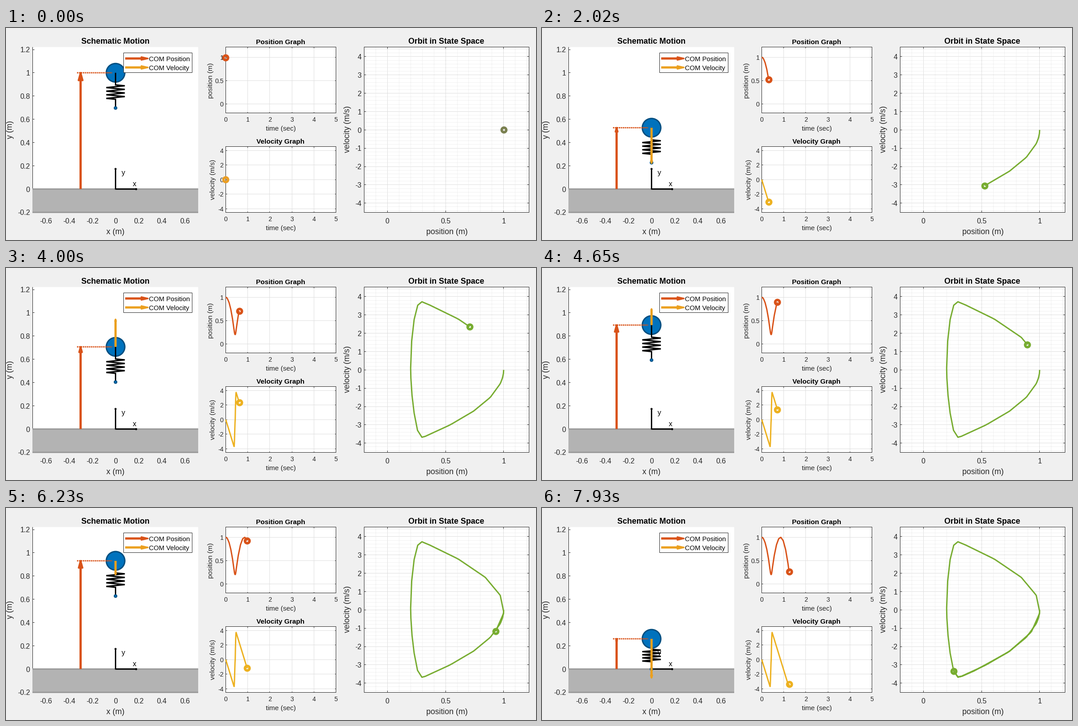
A matplotlib script for the animation above (7990 ms loop, 1183 by 473 pixels).

```python
import numpy as np
import matplotlib.pyplot as plt
from matplotlib.animation import FuncAnimation
from matplotlib.collections import LineCollection
from matplotlib.patches import Circle, Polygon, Rectangle

W, H, DPI = 1183, 473, 128
PT = 72 / DPI
LOOP, STEP = 7990, 34
ORANGE, AMBER, GOLD, GREEN = "#D95319", "#EBA020", "#EDB120", "#77AC30"
BLUE, NAVY, INK = "#0072BD", "#004E80", "#262626"

plt.rcParams["font.family"] = "Liberation Sans"
plt.rcParams["path.snap"] = False
fig = plt.figure(figsize=(W / DPI, H / DPI), dpi=DPI, facecolor="#F0F0F0")
ax = fig.add_axes([0, 0, 1, 1])
ax.set_xlim(0, W)
ax.set_ylim(H, 0)
ax.axis("off")


# ---------- motion: bouncing mass on a spring, sampled every 0.01 s ----------
G, APEX, FALL = 9.81, 0.8505, 0.3778


def flight(times, apex, top):
    t = np.array(times)
    v = G * (apex - t)
    return np.column_stack([t, top - v ** 2 / (2 * G), v])


stance = [(.38, .297, -3.68), (.39, .259, -3.30), (.40, .230, -2.36),
          (.41, .212, -1.40), (.42, .202, -.45), (.43, .200, .10),
          (.44, .209, 1.58), (.45, .230, 2.75), (.46, .261, 3.53),
          (.47, .297, 3.72)]
nodes = np.vstack([
    flight([0, .02, .045, .0765, .153, .2295, .306, FALL], 0, 1),
    stance,
    flight([.49, .567, .669, .769, .866, .974, 1.084, 1.19, APEX + FALL],
           APEX, 1.003),
    [(1.24, .260, -3.35)],
])
ts = np.arange(125) * 0.01
pos = np.interp(ts, nodes[:, 0], nodes[:, 1])
vel = np.interp(ts, nodes[:, 0], nodes[:, 2])

# sample number against playback time in ms
pace = np.array([
    (0, 0), (1, 90), (13, 870), (14, 930), (25, 1640), (26, 1730), (31, 2020),
    (32, 2110), (38, 2480), (39, 2570), (49, 3240), (51, 3330), (52, 3430),
    (61, 4000), (64, 4180), (65, 4240), (78, 5020), (79, 5110), (84, 5380),
    (85, 5470), (92, 5890), (93, 5950), (105, 6700), (106, 6800), (109, 6990),
    (118, 7550), (119, 7610), (124, 7930)])


def sample_at(ms):
    return int(np.interp(ms, pace[:, 1], pace[:, 0]) + 1e-6)


# ---------- drawing helpers, all in stage pixels ----------
def text(x, y, s, size, ha="center", color=INK, bold=False, z=4):
    ax.text(x, y + 0.358 * size, s, fontsize=size * PT, ha=ha, va="baseline",
            color=color, weight="bold" if bold else "normal", zorder=z)


def vtext(x, y, s, size):
    ax.text(x, y, s, fontsize=size * PT, ha="center", va="center",
            rotation=90, color=INK, zorder=4)


def lines(segs, color, width=1, z=2, style="solid"):
    if width == 1:  # hairlines sit on pixel centres
        segs = [np.floor(s) + 0.5 for s in segs]
    ax.add_collection(LineCollection(segs, colors=color, linewidths=width * PT,
                                     linestyles=style, zorder=z))


def stroke(xs, ys, color, width, z, **kw):
    kw = {"solid_capstyle": "butt", "solid_joinstyle": "round", **kw}
    return ax.plot(xs, ys, color=color, lw=width * PT, zorder=z, **kw)[0]


def panel(box, xticks, yticks, fx, fy, size, tick, framed=True):
    """White plot area with ticks, tick labels and (if framed) grid and box."""
    l, t, r, b = box
    ax.add_patch(Rectangle((l, t), r - l, b - t, fc="white", ec="none", zorder=0))
    marks = []
    for v in xticks:
        x = fx(v)
        text(x, b + (18.5 if size > 15 else 14.7), f"{v:g}", size)
        marks += [[(x, b), (x, b - tick)], [(x, t), (x, t + tick)]]
    for v in yticks:
        y = fy(v)
        text(l - 6 + (size < 15), y + 0.5, f"{v:g}", size, ha="right")
        marks += [[(l, y), (l + tick, y)], [(r, y), (r - tick, y)]]
    if framed:
        grid = [[(fx(v), t), (fx(v), b)] for v in xticks]
        grid += [[(l, fy(v)), (r, fy(v))] for v in yticks]
        lines(grid, "#DEDEDE", z=1)
        lines(marks, INK, z=2)
        lines([[(l, t), (r, t), (r, b), (l, b), (l, t)]], INK, z=2)
    else:
        lines([m for m in marks if m[0][0] == l], INK, z=2)
        lines([[(l, t), (l, b)]], INK, z=2)


def arrow_head(x0, y0, x1, y1, back, half):
    d = np.array([x1 - x0, y1 - y0], float)
    d /= max(np.hypot(*d), 1e-9)
    side = np.array([-d[1], d[0]]) * half
    tip = np.array([x1, y1], float)
    base = tip - d * back
    return base, np.array([tip, base + side, base - side])


class Arrow:
    def __init__(self, x, color, z):
        self.x = x
        self.shaft = stroke([], [], color, 5, z)
        self.head = Polygon(np.zeros((3, 2)), fc=color, ec=color, lw=3.8 * PT,
                            joinstyle="round", zorder=z)
        ax.add_patch(self.head)

    def move(self, y0, y1):
        size = abs(y1 - y0)
        base, tri = arrow_head(self.x, y0, self.x, y1, 0.065 * size, 0.018 * size)
        self.shaft.set_data([self.x, self.x], [y0, base[1]])
        self.head.set_xy(tri)
        for part in (self.shaft, self.head):
            part.set_visible(size > 1)


class Trace:
    """Growing curve with a ring at its newest point."""

    def __init__(self, xs, ys, color, first):
        self.xs, self.ys, self.color, self.first = xs, ys, color, first
        self.line = stroke([], [], color, 3, 5)
        self.ring = ax.plot([], [], "o", ms=10.2 * PT, mfc="none",
                            mew=5.6 * PT, zorder=6)[0]

    def show(self, n):
        self.line.set_data(self.xs[:n + 1], self.ys[:n + 1])
        self.ring.set_data(self.xs[n:n + 1], self.ys[n:n + 1])
        self.ring.set_markeredgecolor(self.color if n else self.first)


# ---------- schematic panel ----------
CX, GROUND, UNIT = 244.5, 359.3, 259.4


def sx(v):
    return CX + 258.6 * v


def sy(v):
    return GROUND - UNIT * v


panel((59.5, 42.5, 429, 411.5), np.round(np.arange(-.6, .7, .2), 1) + 0.0,
      np.round(np.arange(-.2, 1.3, .2), 1) + 0.0, sx, sy, 16, 3.7, framed=False)
text(244.5, 29, "Schematic Motion", 17.8, color="black", bold=True)
text(244.5, 453.5, "x (m)", 17.8)
vtext(10, 227, "y (m)", 17.8)
ax.add_patch(Rectangle((59, GROUND), 370, 52, fc="#B3B3B3", ec="none", zorder=3))
lines([[(59, GROUND), (429, GROUND)], [(59, 411.3), (429, 411.3)]],
      "#999999", 3, z=3)

stroke([CX, CX, 290], [313.5, GROUND, GROUND], "black", 3, 5)
ax.plot([CX, 290], [313.5, GROUND], "o", color="black", ms=4.6 * PT, mew=0, zorder=5)
text(262, 322.5, "y", 16, color="black", z=5)
text(287, 347.5, "x", 16, color="black", z=5)

ball = Circle((CX, 0), 20.7, fc=BLUE, ec=NAVY, lw=3 * PT, zorder=7)
ax.add_patch(ball)
spring = stroke([], [], "black", 3, 8, solid_joinstyle="miter")
foot = ax.plot([], [], "o", ms=6 * PT, mfc=BLUE, mec=NAVY, mew=2 * PT, zorder=9)[0]
level = stroke([], [], ORANGE, 3, 10, ls=(0, (1, 0.5)))
pos_arrow = Arrow(166.5, ORANGE, 10)
vel_arrow = Arrow(CX, AMBER, 11)

COILS = 8
spring_x = CX + np.r_[0, 0, 20.7 * (-1.0) ** np.arange(COILS), 0, 0]
spring_f = np.r_[0, .347, .347 + .413 * (np.arange(COILS) + .5) / COILS, .76, 1]

ax.add_patch(Rectangle((262.5, 55.5), 153, 44, fc="white", ec=INK, lw=PT, zorder=20))
for y, color, name in ((68, ORANGE, "COM Position"), (88, AMBER, "COM Velocity")):
    base, tri = arrow_head(266, y, 317, y, 15, 3.4)
    stroke([266, base[0]], [y, y], color, 5, 21)
    ax.add_patch(Polygon(tri, fc=color, ec=color, lw=3 * PT, joinstyle="round",
                         zorder=21))
    text(319.5, y + 1, name, 14.75, ha="left", color="black", z=21)


# ---------- time graphs ----------
def tx(v):
    return 490.5 + 49.2 * v


def py(v):
    return 169.3 - 103.8 * v


def vy(v):
    return 338.3 - 16.3 * v


panel((490.5, 42.5, 736.5, 189.5), range(6), (0, .5, 1), tx, py, 14, 2.5)
text(613, 31, "Position Graph", 15.3, color="black", bold=True)
text(613.5, 223.5, "time (sec)", 15.3)
vtext(457, 117, "position (m)", 15.3)

panel((490.5, 264.5, 736.5, 411.5), range(6), range(-4, 5, 2), tx, vy, 14, 2.5)
text(613, 253, "Velocity Graph", 15.3, color="black", bold=True)
text(613.5, 445.5, "time (sec)", 15.3)
vtext(462.5, 338, "velocity (m/s)", 15.3)


# ---------- state space ----------
def ox(v):
    return 851.3 + 259.5 * v


def oy(v):
    return 227.3 - 40.85 * v


minor = [[(ox(k / 10), 42.5), (ox(k / 10), 411.5)]
         for k in range(-1, 13) if k % 5]
minor += [[(799, oy(k / 5)), (1168, oy(k / 5))] for k in range(-22, 23) if k % 5]
panel((799.5, 42.5, 1167.5, 411.5), (0, .5, 1), range(-4, 5), ox, oy, 16, 3.7)
lines(minor, "#D6D6D6", z=0.8, style=(0, (1, 2)))
text(983, 29, "Orbit in State Space", 17.8, color="black", bold=True)
text(984, 453.5, "position (m)", 17.8)
vtext(763, 226, "velocity (m/s)", 17.8)

traces = [Trace(tx(ts), py(pos), ORANGE, ORANGE),
          Trace(tx(ts), vy(vel), GOLD, "#EA9E24"),
          Trace(ox(pos), oy(vel), GREEN, "#7A8050")]


def update(frame):
    n = sample_at(frame * STEP + 25)
    y = sy(pos[n])
    end = sy(max(pos[n] - 0.3, 0))
    ball.center = (CX, y)
    spring.set_data(spring_x, y + spring_f * (end - y))
    foot.set_data([CX], [end])
    level.set_data([158.5, 236.5], [y, y])
    pos_arrow.move(GROUND, y)
    vel_arrow.move(y, y - 0.1 * UNIT * vel[n])
    for trace in traces:
        trace.show(n)
    return []


anim = FuncAnimation(fig, update, frames=LOOP // STEP, interval=STEP,
                     repeat=True, repeat_delay=0, init_func=lambda: update(0))
plt.show()
```
